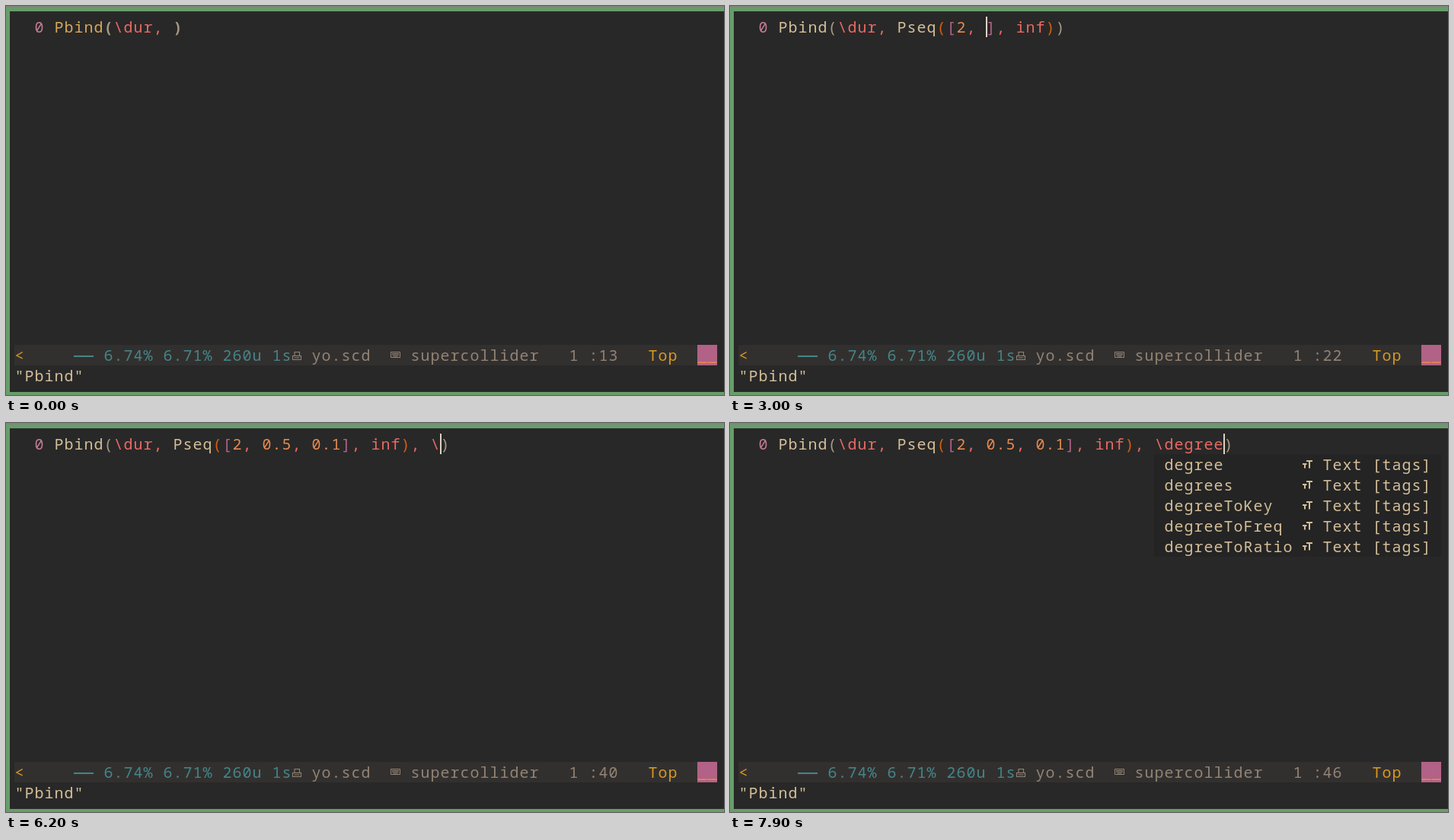
An HTML page for the animation above (8 s loop, 943 px wide and 512 px high).

```html
<!DOCTYPE html>
<html lang="en">
<head>
<meta charset="utf-8">
<title>Pattern editing</title>
<style>
  html, body { margin: 0; width: 100%; height: 100%; overflow: hidden; background: #282828; }
  #stage { position: absolute; left: 0; top: 0; width: 943px; height: 512px; overflow: hidden;
    background: #282828; font: 20px/27px "Noto Sans Mono", monospace; letter-spacing: 1px; color: #d4be98; }
  #stage div, #stage svg { position: absolute; white-space: pre; }
  .t { height: 27px; margin-left: .5px; }
  .pop { background: #242424; overflow: hidden; }
  .pop svg { overflow: visible; }
  b { font-weight: 700; }
</style>
</head>
<body>
<div id="stage">
  <div id="base"></div>
  <div id="live"></div>
</div>
<script>
const CW = 13, RH = 27, X0 = 11, Y0 = 14, LOOP = 8000, RIGHT = 71;
const INK = { fg: '#d4be98', red: '#ea6962', num: '#e78a4e', outer: '#a89984', inner: '#d65d0e',
  pink: '#b16286', yellow: '#d8a657', gold: '#d79921', teal: '#458588', gray: '#928374' };

const rect = (x, y, w, h, fill) =>
  `<div style="left:${x}px;top:${y}px;width:${w}px;height:${h}px;background:${fill}"></div>`;
const cell = (col, row, n, fill) => rect(X0 + col * CW, Y0 + row * RH, n * CW, RH, fill);
const at = (col, row, html, ink = INK.fg) =>
  `<div class="t" style="left:${X0 + col * CW}px;top:${Y0 + row * RH}px;color:${ink}">${html}</div>`;
const icon = (x, y, d, ink, w) =>
  `<svg width="13" height="27" style="left:${x}px;top:${y}px"><path d="${d}" fill="none" stroke="${ink}" stroke-width="${w}"/></svg>`;

const KIND = 'M5 9H13M9 9V18.5M0 13H5.5M3 13V18.5';
const PRINTER = 'M1.5 14.5H12.5V19.5H1.5ZM4 14V9.5H10.5V14M3.5 17H10.5';
const KEYS = 'M.5 9.5H12.5V16.5H.5ZM2 11.5H11M2 13.2H11M3.5 15H9.5';

// Window border, status line and message
document.getElementById('base').innerHTML =
  rect(0, 0, 943, 2, '#7b8a78') + rect(0, 2, 943, 5, '#689d6a') +
  rect(0, 2, 5, 510, '#689d6a') + rect(0, 508, 943, 4, '#689d6a') +
  cell(0, 16, RIGHT, '#32302f') + cell(69, 16, 2, INK.pink) +
  at(2, 0, '0', '#c67b98') + at(0, 16, '&lt;', INK.gold) +
  rect(89, 460, 26, 2, INK.teal) + at(9, 16, '6.74% 6.71% 260u 1s', INK.teal) +
  icon(375, 446, PRINTER, INK.gray, 1.1) + at(30, 16, 'yo.scd', INK.gray) +
  icon(505, 446, KEYS, INK.gray, 1) + at(40, 16, 'supercollider', INK.gray) +
  at(56, 16, '1', INK.gray) + at(64, 16, 'Top', INK.gold) + at(69, 16, '__', INK.num) +
  at(0, 17, '"Pbind"');

// Colours one line of code; paired lists the bold bracket positions
function paint(code, early, paired = []) {
  let depth = 0;
  return code.replace(/Pbind|\\\w*|\d[\d.]*|inf|[(),\[\]]|[A-Z]\w*|\s/g, (tok, i) => {
    let ink = INK.fg;
    if (tok === '(') ink = depth++ ? INK.inner : INK.outer;
    else if (tok === ')') ink = --depth ? INK.inner : INK.outer;
    else if (/[\[\]]/.test(tok)) ink = INK.pink;
    else if (/^\d/.test(tok)) ink = INK.num;
    else if (/^[\\,]|^inf$/.test(tok)) ink = INK.red;
    else if (tok === 'Pbind' && early) ink = INK.yellow;
    const tag = paired.includes(i) ? 'b' : 'span';
    return `<${tag} style="color:${ink}">${tok}</${tag}>`;
  });
}

// Completion menu: one column of words, a kind icon and its source
function menu({ col, words, len = 0, bar }) {
  const longest = Math.max(len, ...words.map(w => w.length));
  const kind = longest + 2, wide = Math.min(RIGHT - col, kind + 14), tall = words.length;
  const rows = words.map((w, r) => {
    const text = (c, s) => `<div class="t" style="left:${c * CW}px;top:${r * RH}px">${s}</div>`;
    return text(1, w) + icon(kind * CW, r * RH, KIND, INK.fg, 2) + text(kind + 2, 'Text [tags]');
  }).join('');
  const scroll = bar ? rect((wide - 1) * CW, 0, CW, tall * RH, '#302f2e') +
    rect((wide - 1) * CW, 0, CW, RH, '#5d5249') : '';
  return `<div class="pop" style="left:${X0 + col * CW}px;top:${Y0 + RH}px;width:${wide * CW}px;height:${tall * RH}px">${rows}${scroll}</div>`;
}

const list = s => s.split(' ');
const pats = list('Pn Pdef Pkey Pfin Pseq Pser Penv Pbind Pfunc Pgeom Pwhite Prand Pchain Pseries Pswitch Pattern');
const pWords = list('Pseq Pser Pseg Pset Psym Psync Pseqr Psetp Pstep Pshuf Pspawn Pslide Pswitch Pseries Psetpre Pstutter');
const ones = list('CC14 Allpass1 BFDecode1 BFEncode1 Cheeseverb1 AllBufTest1 AddCorderTest1 BinauralDecodersTest1 BandSplittingAmbisonicsEncoderTest1');
const eWords = list('expintEi expintEn expressionEvents errorPageEnabled encodeStandardEntities ele ele_ even embed enter event every enable encode etName event_');
const degrees = list('degree degrees degreeToKey degreeToFreq degreeToRatio');
const dWords = degrees.concat(list('deg delay delta detune decode default defer deepCopy delete depth detect'));

const pMenu = (words, len, bar) => ({ col: 15, words, len, bar });
const sMenu = (words, len, bar) => ({ col: 42, words, len, bar });
const eMenu = sMenu(eWords, 25, true), dMenu = sMenu(dWords, 25, true), degMenu = sMenu(degrees);

// [time, code after "Pbind(\dur, ", cursor column, extras]
const seq = 'Pseq([2, 0.5, 0.1], inf)', sym = seq + ', \\';
const steps = [
  [0, ')', 13, { off: 1, pair: [5, 12], early: 1 }],
  [200, ')', 13, { block: 1, pair: [5, 12], early: 1 }],
  [300, ')', 13, { early: 1 }],
  [600, 'P)', 14, { menu: pMenu(pats, 34, true) }],
  [700, 'Ps)', 15, { menu: pMenu(pWords, 20, true) }],
  [800, 'Pse)', 16, { menu: pMenu(pWords.filter(w => /^Pse/.test(w))) }],
  [900, 'Pseq)', 17, { menu: pMenu(list('Pseq Pseqr')) }],
  [1200, 'Pseq([1.0], inf))', 19, { block: 1, sel: 3, cmd: '3' }],
  [2000, 'Pseq([1.0], inf))', 19, { off: 1, sel: 3, cmd: '3' }],
  [2500, 'Pseq([2], inf))', 20],
  [2800, 'Pseq([2,, inf))', 20, { cmd: ',' }],
  [3000, 'Pseq([2, ], inf))', 22],
  [3100, 'Pseq([2, 0], inf))', 23],
  [3300, 'Pseq([2, 0.], inf))', 24],
  [3400, 'Pseq([2, 0.5], inf))', 25],
  [3700, 'Pseq([2, 0.5,, inf))', 25, { cmd: ',' }],
  [3800, 'Pseq([2, 0.5, ], inf))', 27],
  [4000, 'Pseq([2, 0.5, 0], inf))', 28],
  [4200, 'Pseq([2, 0.5, 0.], inf))', 29],
  [4300, seq + ')', 30, { menu: { col: 31, words: ones } }],
  [5000, seq + ')', 33, { block: 1, sel: 3, cmd: '3' }],
  [5400, seq + ')', 37, { pair: [16, 35] }],
  [5700, seq + ',', 37, { cmd: ',', pair: [16, 35] }],
  [5800, seq + ', )', 39],
  [6200, sym + ')', 40],
  [6800, sym + 'e)', 41, { menu: eMenu }],
  [6900, sym + 'ed)', 42],
  [7000, sym + 'e)', 41, { menu: eMenu }],
  [7100, sym + ')', 40],
  [7200, sym + 'd)', 41],
  [7300, sym + 'd)', 41, { menu: dMenu }],
  [7400, sym + 'de)', 42],
  [7500, sym + 'de)', 42, { menu: dMenu }],
  [7600, sym + 'deg)', 43, { menu: dMenu }],
  [7700, sym + 'degr)', 44, { menu: degMenu }],
  [7800, sym + 'degre)', 45, { menu: degMenu }],
  [7900, sym + 'degree)', 46, { menu: degMenu }]
];

const live = document.getElementById('live');

function show([, tail, pos, o = {}]) {
  const code = 'Pbind(\\dur, ' + tail, cur = pos + 3;
  let html = o.sel ? cell(cur, 0, o.sel, '#504945') : '';
  html += at(4, 0, paint(code, o.early, o.pair));
  if (o.block) html += cell(cur, 0, 1, '#d3d0c8') + at(cur, 0, code[pos - 1], '#282828');
  else if (!o.off) html += rect(X0 + cur * CW, Y0, 2, RH, '#d9d3c3');
  html += at(58, 16, ':' + pos, INK.gray);
  if (o.cmd) html += at(60, 17, o.cmd);
  if (o.menu) html += menu(o.menu);
  live.innerHTML = html;
}

const start = performance.now();
let shown = -1;
function tick() {
  const t = (performance.now() - start) % LOOP;
  const i = steps.findLastIndex(s => s[0] <= t);
  if (i !== shown) show(steps[shown = i]);
  requestAnimationFrame(tick);
}
tick();
</script>
</body>
</html>
```
